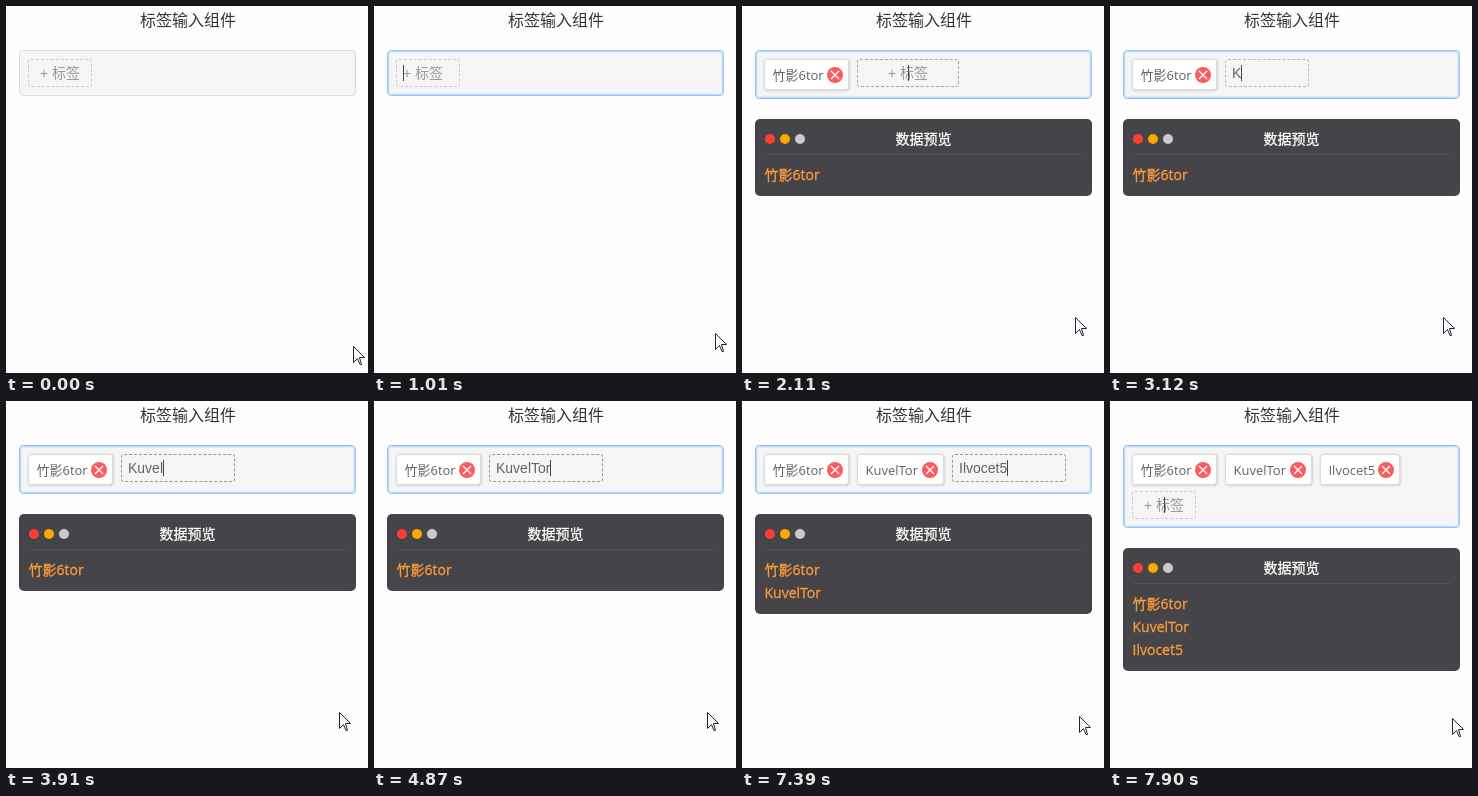
These frames come from a looping animation (362x367 px, 8000 ms). An HTML page:

```html
<!DOCTYPE html>
<html lang="zh">
<head>
<meta charset="utf-8">
<title>标签输入组件</title>
<style>
  html, body { margin: 0; width: 100%; height: 100%; overflow: hidden; background: #fefefe; }
  svg { display: block; }
  text { font: 14px "Open Sans", "Noto Sans CJK SC", "Noto Sans CJK", sans-serif; white-space: pre; }
  .title { font-size: 16px; fill: #333; }
  .tag { font-size: 13px; fill: #606266; }
  .input { font-family: "Liberation Sans", "Noto Sans CJK SC", "Noto Sans CJK", sans-serif; }
  .head { fill: #fff; stroke: #fff; stroke-width: .3px; }
  .row { fill: #ff9a3c; stroke: #ff9a3c; stroke-width: .3px; }
  .dashed { box-sizing: border-box; height: 28px; border: 1px dashed; border-radius: 3px; }
</style>
</head>
<body>
<svg id="stage" width="362" height="367" viewBox="0 0 362 367">
  <defs>
    <filter id="drop" x="-10%" y="-20%" width="120%" height="140%"><feGaussianBlur stdDeviation=".8"/></filter>
  </defs>
  <text class="title" x="182" y="20" text-anchor="middle">标签输入组件</text>
  <g id="form"></g>
  <path id="mouse" d="M.5 .5V16.5L4.5 12.5 7 18.5H8.5L6.5 11.5H11.5Z"
        fill="#fff" stroke="#223" stroke-linejoin="round"/>
</svg>
<script>
const LOOP = 8000;
const SMALL = 64, WIDE = 114;
const NAMES = ['竹影6tor', 'KuvelTor', 'Ilvocet5'];
const TAGS = [{ x: 22, w: 85 }, { x: 115, w: 87 }, { x: 210, w: 80 }];

// Each step changes only the listed parts of the state.
const STEPS = [
  [0, { mouse: [347, 340], focus: false, left: false, caret: false, tags: 0, text: '', w: SMALL }],
  [460, { mouse: [346, 337] }],
  [600, { mouse: [343, 331] }],
  [730, { mouse: [341, 327] }],
  [1010, { focus: true, left: true, caret: true }],
  [1160, { mouse: [336, 318], w: 104 }],
  [1280, { mouse: [333, 311], w: WIDE }],
  [1560, { text: '竹影' }],
  [1700, { text: '竹影6' }],
  [1840, { text: '竹影6tor' }],
  [2110, { tags: 1, text: '', left: false, w: 102 }],
  [2260, { w: 68 }],
  [2410, { w: SMALL }],
  [2690, { caret: false }],
  [3120, { caret: true, left: true, text: 'K', w: 84 }],
  [3260, { w: WIDE }],
  [3380, { text: 'Ku' }],
  [3510, { text: 'Kuv' }],
  [3790, { text: 'Kuve' }],
  [3910, { text: 'Kuvel' }],
  [4190, { text: 'KuvelT' }],
  [4340, { text: 'KuvelTo' }],
  [4620, { text: 'KuvelTor' }],
  [4880, { tags: 2, text: '', left: false, w: 92 }],
  [5000, { w: SMALL }],
  [5270, { caret: false }],
  [5860, { caret: true, left: true, text: 'I', w: 84 }],
  [6010, { text: 'Ilv', w: WIDE }],
  [6290, { text: 'Ilvo' }],
  [6430, { text: 'Ilvoc' }],
  [6700, { text: 'Ilvoce', mouse: [340, 312] }],
  [6840, { mouse: [345, 314] }],
  [7120, { text: 'Ilvocet', mouse: [342, 314] }],
  [7250, { mouse: [339, 315] }],
  [7390, { text: 'Ilvocet5', mouse: [337, 315] }],
  [7510, { mouse: [338, 315] }],
  [7640, { tags: 3, text: '', left: false, w: 92, mouse: [340, 316] }],
  [7770, { w: SMALL }],
  [7900, { mouse: [342, 317] }]
];

const form = document.getElementById('form');
const mouse = document.getElementById('mouse');
const pen = document.createElement('canvas').getContext('2d');
pen.font = '14px "Liberation Sans", "Noto Sans CJK SC", "Noto Sans CJK", sans-serif';

const box = (x, y, w, h, r, attrs) =>
  `<rect x="${x}" y="${y}" width="${w}" height="${h}" rx="${r}" ${attrs}/>`;
const label = (x, y, str, attrs) => `<text x="${x}" y="${y}" ${attrs}>${str}</text>`;
const line = (x, y, w, color) => `<path d="M${x} ${y}h${w}" stroke="${color}"/>`;

function drawField(h, focus) {
  const back = box(13.5, 44.5, 336, h - 1, 3.5, `fill="#f5f5f5" stroke="${focus ? '#93c6f9' : '#dcdcdc'}"`);
  if (!focus) return back;
  return back + box(14.5, 45.5, 334, h - 3, 3, 'fill="none" stroke="#b4d8fb"') +
    box(15.5, 46.5, 332, h - 5, 2, 'fill="none" stroke="#e6eff8"');
}

function drawTag({ x, w }, i) {
  const cx = x + w - 14;
  return box(x + .5, 53.5, w, 31, 3, 'fill="#c4c4c4" filter="url(#drop)"') +
    box(x + .5, 53.5, w - 1, 30, 3, 'fill="#fff" stroke="#dcdcdc"') +
    label(x + 8.5, 73.5, NAMES[i], 'class="tag"') +
    `<circle cx="${cx}" cy="69" r="8" fill="#fb5c5c"/>` +
    `<path d="M${cx - 4} 65l8 8m0-8l-8 8" stroke="#fff" stroke-width="1.3"/>`;
}

function drawInput(x, y, s) {
  const gray = Math.round(204 - 51 * (s.w - SMALL) / (WIDE - SMALL));
  const mid = x + s.w / 2;
  let out = `<foreignObject x="${x}" y="${y}" width="${s.w}" height="28">` +
    `<div class="dashed" style="border-color:rgb(${gray},${gray},${gray})"></div></foreignObject>`;
  if (s.text) out += label(x + 7, y + 19, s.text, 'class="input" fill="#606266"');
  else if (s.left) out += label(x + 7, y + 19, '+ 标签', 'class="input" fill="#999"');
  else out += label(mid, y + 19, '+ 标签', 'class="input" fill="#999" text-anchor="middle"');
  if (s.caret) {
    const at = s.left ? x + 7 + pen.measureText(s.text).width : Math.floor(mid);
    out += box(Math.round(at), y + 6, 1, 16, 0, 'fill="#444"');
  }
  return out;
}

function drawPanel(y, count) {
  const dots = ['#ff3b3b', '#ffa500', '#cacaca'].map((c, i) =>
    `<circle cx="${28 + 15 * i}" cy="${y + 20}" r="5" fill="${c}"/>`).join('');
  const rows = NAMES.slice(0, count).map((name, i) =>
    label(22.5, y + 61 + 23 * i, name, 'class="row"')).join('');
  return box(13, y, 337, 54 + 23 * count, 5, 'fill="#454549"') + dots +
    label(181.5, y + 25.3, '数据预览', 'class="head" text-anchor="middle"') +
    line(23, y + 35.5, 318, '#525256') + rows;
}

function draw(s) {
  const wraps = s.tags === 3;
  const h = wraps ? 83 : s.tags ? 49 : 46;
  const x = [22, 115, 210, 22][s.tags];
  form.innerHTML = drawField(h, s.focus) +
    TAGS.slice(0, s.tags).map(drawTag).join('') +
    drawInput(x, wraps ? 90 : 53, s) +
    (s.tags ? drawPanel(64 + h, s.tags) : '');
  mouse.setAttribute('transform', `translate(${s.mouse})`);
}

let state = {};
const states = STEPS.map(([at, change]) => ({ at, s: state = { ...state, ...change } }));

let shown;
const start = performance.now();
function tick() {
  const t = Math.max(0, performance.now() - start) % LOOP;
  const now = states.filter(e => e.at <= t).pop();
  if (now !== shown) draw((shown = now).s);
  requestAnimationFrame(tick);
}
tick();
</script>
</body>
</html>
```
